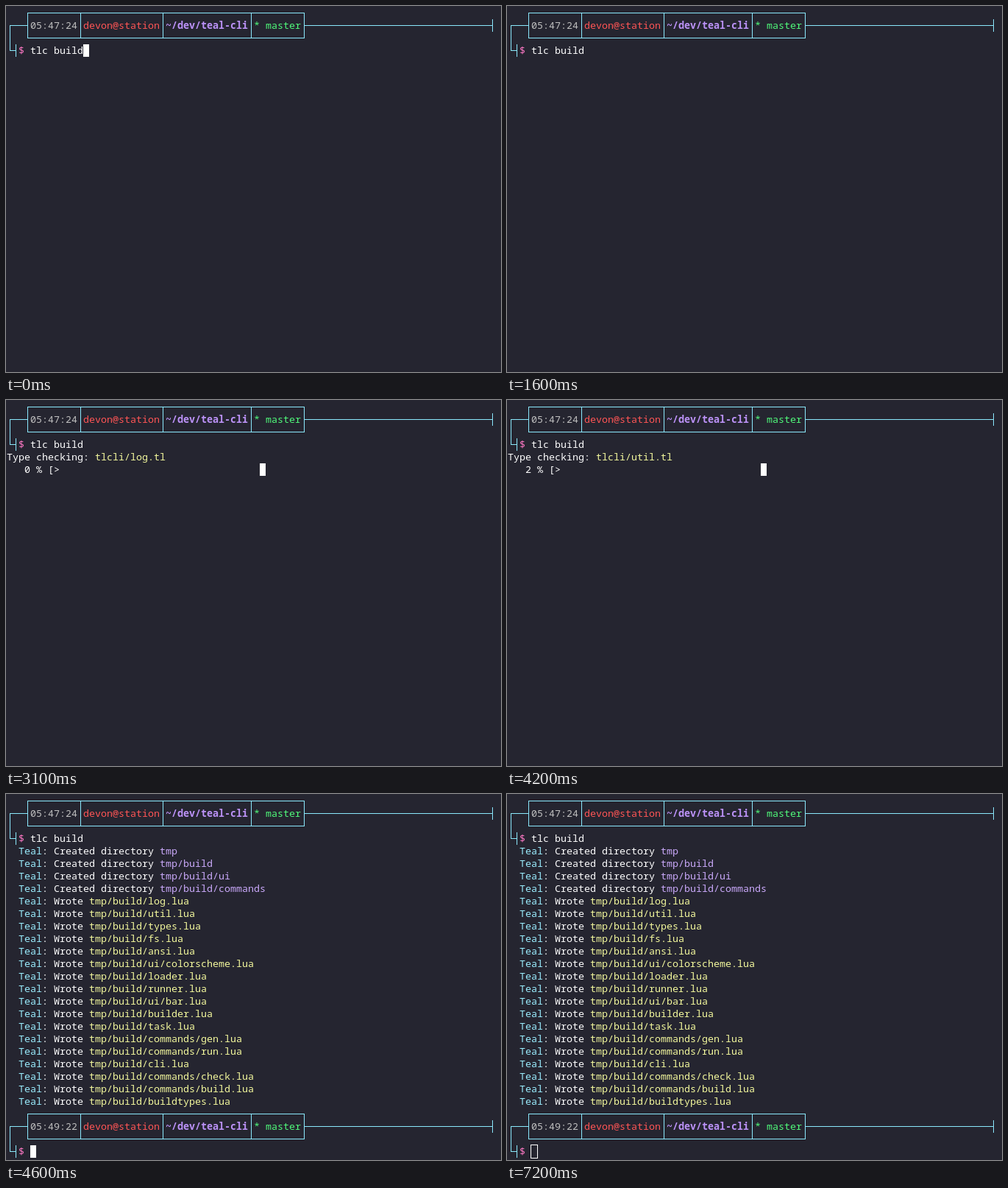
Write an HTML page with a canvas that moves like this. It is 673x497 px and loops after 8500 ms.

```html
<!DOCTYPE html>
<html lang="en">
<head>
<meta charset="utf-8">
<title>Terminal build</title>
<style>
  html, body { margin: 0; width: 100%; height: 100%; overflow: hidden; background: #252530; }
  canvas { display: block; }
</style>
</head>
<body>
<canvas id="stage" width="673" height="497"></canvas>
<script>
const ctx = document.getElementById('stage').getContext('2d');
const LOOP = 8500, CW = 8, CH = 17;
const C = {
  bg: '#252530', white: '#ffffff', grey: '#bfbfbf', red: '#ff5555', purple: '#bd93f9',
  lilac: '#caa9fa', green: '#50fa7b', cyan: '#8be9fd', aqua: '#9aedfe',
  pink: '#ff79c6', yellow: '#f4f99d'
};
const FILES = ('log util types fs ansi ui/colorscheme loader runner ui/bar builder task ' +
  'commands/gen commands/run cli commands/check commands/build buildtypes').split(' ');
const DIRS = ['tmp', 'tmp/build', 'tmp/build/ui', 'tmp/build/commands'];
const STEPS = 36, BAR = 34;

const colX = col => 1 + col * CW;
const rowY = row => 1 + row * CH;

function text(col, row, str, color, weight = 500) {
  ctx.font = weight + ' 13.3333px "Noto Sans Mono", "DejaVu Sans Mono", monospace';
  ctx.fillStyle = color;
  ctx.fillText(str, colX(col), rowY(row) + 13);
}

function hline(x1, x2, y) {
  ctx.fillStyle = C.cyan;
  ctx.fillRect(x1, y, x2 - x1 + 1, 1);
}

function vline(x, y1, y2) {
  ctx.fillStyle = C.cyan;
  ctx.fillRect(x, y1, 1, y2 - y1 + 1);
}

function cursor(col, row) {
  ctx.fillStyle = C.white;
  ctx.fillRect(colX(col), rowY(row), CW, CH);
}

function hollowCursor(col, row) {
  ctx.strokeStyle = C.white;
  ctx.lineWidth = 1;
  ctx.strokeRect(colX(col) - 0.5, rowY(row) - 0.5, CW + 1, CH + 1);
}

function prompt(row, time) {
  const y = rowY(row) + 8, mid = y + CH, low = mid + 2 * CH;
  hline(5, 29, mid);
  vline(5, mid, low);
  hline(5, 13, low);
  vline(13, low - 8, low + 8);
  hline(405, 661, mid);
  vline(661, mid - 8, mid + 8);
  hline(29, 405, y);
  hline(29, 405, mid + CH);
  for (const col of [3, 12, 26, 41, 50]) vline(colX(col) + 4, y, mid + CH);
  text(4, row + 1, time, C.grey);
  text(13, row + 1, 'devon@station', C.red);
  text(27, row + 1, '~/dev/teal-cli', C.purple, 600);
  text(42, row + 1, '* master', C.green);
  text(2, row + 3, '$', C.pink);
}

function progress(step) {
  const writing = step > FILES.length;
  const label = writing ? 'Writing: ' : 'Type checking: ';
  const path = writing ? 'tmp/build/' + FILES[step - FILES.length - 1] + '.lua'
                       : 'tlcli/' + FILES[step] + '.tl';
  const part = step / STEPS;
  const percent = String(Math.floor(part * 100)).padStart(4);
  const bar = ('='.repeat(Math.floor(part * BAR)) + '>').padEnd(BAR);
  text(0, 4, label, C.white);
  text(label.length, 4, path, C.yellow);
  text(0, 5, percent + ' % [' + bar + ' ]', C.white);
}

function logLine(row, verb, path, color) {
  text(2, row, 'Teal', C.aqua);
  text(6, row, ': ' + verb, C.white);
  text(9 + verb.length, row, path, color);
}

function result() {
  DIRS.forEach((dir, i) => logLine(4 + i, 'Created directory', dir, C.lilac));
  FILES.forEach((file, i) => logLine(8 + i, 'Wrote', 'tmp/build/' + file + '.lua', C.yellow));
  prompt(25, '05:49:22');
}

// The cursor toggles every 600 ms.
const blink = since => Math.floor(since / 600) % 2 === 0;

function draw(t) {
  ctx.fillStyle = C.bg;
  ctx.fillRect(0, 0, 673, 497);
  prompt(0, '05:47:24');
  text(4, 3, 'tlc build', C.white);
  if (t < 3000) {
    if (blink(t + 200)) cursor(13, 3);
  } else if (t < 3100) {
    cursor(0, 4);
  } else if (t < 4600) {
    progress(t < 4200 ? 0 : 1 + 7 * Math.floor((t - 4200) / 100));
    if (t < 3600 || t >= 4200) cursor(43, 5);
  } else {
    result();
    if (t >= 7200) hollowCursor(4, 28);
    else if (blink(t - 4200)) cursor(4, 28);
  }
}

const start = performance.now();
function tick() {
  draw((performance.now() - start) % LOOP);
  requestAnimationFrame(tick);
}
tick();
</script>
</body>
</html>
```
